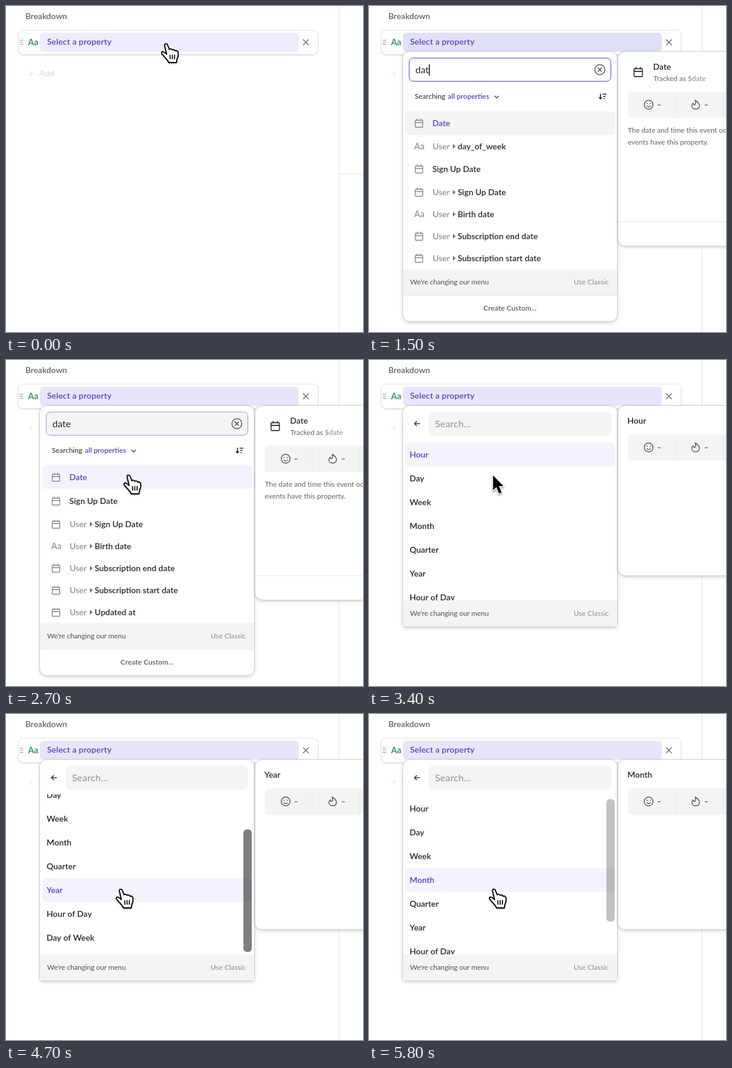
An HTML page with a canvas that plays this animation: 600 by 548 pixels, repeating every 5900 ms.

```html
<!DOCTYPE html>
<html lang="en">
<head>
<meta charset="utf-8">
<title>Property picker</title>
<style>
html, body { margin: 0; width: 100%; height: 100%; overflow: hidden; background: #fff; }
canvas { display: block; width: 600px; height: 548px; }
</style>
</head>
<body>
<canvas id="stage"></canvas>
<script>
const W = 600, H = 548, LOOP = 5900, STEP = 100;
const canvas = document.getElementById('stage');
const ctx = canvas.getContext('2d');
const ratio = window.devicePixelRatio || 1;
canvas.width = W * ratio;
canvas.height = H * ratio;

const INK = '#262626', SOFT = '#626266', GRAY = '#88888c', PURPLE = '#5243c6';
const LAVENDER = '#f4f2fd', PANEL = '#f4f4f4', LINE = '#e4e4e4';

// Rows: icon, label, optional parent flag
const START_ROWS = [
  ['aa', 'Login Method'], ['aa', 'Country'], ['aa', 'Campaign Source'],
  ['list', 'Account Type'], ['aa', 'Event Name'], ['aa', 'Platform'], ['aa', 'Distinct ID']
];
const SHARED_ROWS = [
  ['cal', 'Sign Up Date', true], ['aa', 'Birth date', true],
  ['cal', 'Subscription end date', true], ['cal', 'Subscription start date', true]
];
const DAT_ROWS = [['cal', 'Date'], ['aa', 'day_of_week', true], ['cal', 'Sign Up Date'], ...SHARED_ROWS];
const DATE_ROWS = [['cal', 'Date'], ['cal', 'Sign Up Date'], ...SHARED_ROWS, ['cal', 'Updated at', true]];
const DAT_Y = [197, 236, 274, 313, 350, 387, 424];
const DATE_Y = [197, 237, 276, 313, 350, 387, 424];
const UNITS = ['Hour', 'Day', 'Week', 'Month', 'Quarter', 'Year', 'Hour of Day', 'Day of Week'];

const clamp = v => Math.max(0, Math.min(1, v));
const mix = (a, b, p) => a + (b - a) * p;
const span = (t, a, b) => clamp((t - a) / (b - a));
const ease = p => p * p * (3 - 2 * p);

// y is the middle of the capitals
function text(str, x, y, size, color, weight = 400, align = 'left', spacing = 0) {
  ctx.font = `${weight} ${size}px Lato, "Open Sans", sans-serif`;
  ctx.textAlign = align;
  ctx.letterSpacing = spacing + 'px';
  ctx.fillStyle = color;
  ctx.fillText(str, x, Math.round(y + size * 0.355));
  return ctx.measureText(str).width;
}

function box(x, y, w, h, r, fill, stroke) {
  ctx.beginPath();
  ctx.roundRect(x, y, w, h, r);
  if (fill) { ctx.fillStyle = fill; ctx.fill(); }
  if (stroke) { ctx.strokeStyle = stroke; ctx.lineWidth = 1; ctx.stroke(); }
}

function stroke(d, color, width = 1.4) {
  ctx.strokeStyle = color;
  ctx.lineWidth = width;
  ctx.stroke(new Path2D(d));
}

function at(x, y, draw) {
  ctx.save();
  ctx.translate(x, y);
  draw();
  ctx.restore();
}

function shadow(alpha, blur, dy) {
  ctx.shadowColor = `rgba(0,0,0,${alpha})`;
  ctx.shadowBlur = blur * ratio;
  ctx.shadowOffsetY = dy * ratio;
}

// The border lies just outside the given rectangle
function card(x, y, w, h, r) {
  ctx.save();
  shadow(0.22, 6, 2);
  box(x, y, w, h, r, '#fff');
  ctx.restore();
  box(x - 0.5, y - 0.5, w + 1, h + 1, r, '#fff', '#cdcdcf');
}

function calendar(x, y, color, s = 1) {
  at(x, y, () => {
    ctx.scale(s, s);
    stroke('M-5 -5H5Q6.3 -5 6.3 -3.7V5.5Q6.3 6.8 5 6.8H-5Q-6.3 6.8 -6.3 5.5V-3.7Q-6.3 -5 -5 -5ZM-6.3 -1H6.3M-3.3 -7.5V-4M3.3 -7.5V-4', color);
  });
}

function icon(kind, y) {
  if (kind === 'aa') text('Aa', 76, y - 0.5, 14.5, GRAY, 500);
  else if (kind === 'cal') calendar(84, y, GRAY);
  else at(84, y, () => stroke('M-7 -5H-5M-7 0H-5M-7 5H-5M-2.5 -5H8M-2.5 0H8M-2.5 5H8', GRAY, 1.6));
}

function row(kind, label, child, y, active) {
  icon(kind, y);
  if (child) {
    text('User', 107, y, 14, GRAY, 500);
    at(141, y, () => { ctx.fillStyle = '#707074'; ctx.fill(new Path2D('M0 -4L4.5 0L0 4Z')); });
  }
  text(label, child ? 149 : 106.5, y, 14, active ? PURPLE : INK, 600);
}

function page(t) {
  ctx.fillStyle = '#fff';
  ctx.fillRect(0, 0, W, H);
  stroke('M559.5 0V548M560 282.5H600', LINE, 1);
  text('Breakdown', 32.5, 17, 14, '#626262', 600);
  ctx.save();
  shadow(0.12, 2, 1);
  box(20.5, 40.5, 504, 41, 8, '#fff', '#e3e3e3');
  ctx.restore();
  box(20.5, 40.5, 504, 41, 8, '#fff', '#e3e3e3');
  stroke('M23 57.5H29M23 61H29M23 64.5H29', '#8c8c8c', 1);
  text('Aa', 37, 60.5, 14.5, '#36946b', 700);
  box(57, 45, 435, 32, 6, t < 100 ? '#eeebfc' : t < 2600 ? '#e0dff8' : '#e8e5fb');
  text('Select a property', 69, 60.5, 14, PURPLE, 600, 'left', 0.18);
  at(504, 61, () => stroke('M-4.7 -4.7L4.7 4.7M4.7 -4.7L-4.7 4.7', '#666'));
  at(42, 114, () => stroke('M-5 0H5M0 -5V5', t < 200 ? '#dcdcdc' : '#ebebeb', 1.1));
  text('Add', 55.5, 113, 14, '#d9d9d9', 400, 'left', 0.2);
}

function footer(y) {
  ctx.fillStyle = PANEL;
  ctx.fillRect(57, y, 360, 44);
  text("We're changing our menu", 69, y + 22, 12, '#505054', 400, 'left', -0.1);
  text('Use Classic', 403, y + 22, 12, '#8c8c90', 400, 'right');
}

function clipped(top, bottom, draw) {
  ctx.save();
  ctx.beginPath();
  ctx.rect(57, top, 360, bottom - top);
  ctx.clip();
  draw();
  ctx.restore();
}

function searchField(t, query) {
  const focusRing = t >= 1500, blurred = t >= 2700;
  if (focusRing) box(67.5, 87.5, 339, 39, 7, blurred ? PANEL : '#fff', blurred ? '#9c92dc' : PURPLE);
  const w = query ? text(query, 78, 107.5, 16, INK) : 0;
  if (!query) text('Search...', 78, 107.5, 16, '#929296', 400, 'left', 0.2);
  if (!blurred) {
    ctx.fillStyle = '#111';
    ctx.fillRect(78 + w, 98, 1.6, 19);
  }
  if (query) {
    at(388, 107, () => {
      ctx.beginPath();
      ctx.arc(0, 0, 8.4, 0, Math.PI * 2);
      ctx.strokeStyle = '#58585c';
      ctx.lineWidth = 1.5;
      ctx.stroke();
      stroke('M-3.4 -3.4L3.4 3.4M3.4 -3.4L-3.4 3.4', '#58585c', 1.5);
    });
  }
}

function mainMenu(t) {
  const searching = t >= 1500;
  const query = 'date'.slice(0, t < 900 ? 0 : t < 1100 ? 1 : t < 1200 ? 2 : t < 1800 ? 3 : 4);
  const rows = !searching ? START_ROWS : t < 1900 ? DAT_ROWS : DATE_ROWS;
  card(57, 77, 360, 453, 12);
  searchField(t, query);

  const x = searching ? 132.5 : 109.5;
  text(searching ? 'Searching' : 'Show', 77, 152, 12, INK);
  text('all properties', x, 152, 12, PURPLE, 600);
  at(x + 82, 153, () => stroke('M-3.5 -2L0 1.7L3.5 -2', PURPLE, 1.6));
  at(392.5, 152, () => stroke('M-3.5 -4.5V4M-6 1.5L-3.5 4.2L-1 1.5M0 -3.8H6.5M1 0H5M1.5 3.8H3.5', '#262626', 1.6));

  box(61, 177, 352, 40, 6, searching && t < 2600 ? PANEL : LAVENDER);
  clipped(170, 442, () => rows.forEach(([kind, label, child], i) => {
    const y = !searching ? 197 + 40 * i : (t < 1900 ? DAT_Y : DATE_Y)[i];
    row(kind, label, child, y, i === 0);
  }));
  footer(442);
  stroke('M57 486.5H417', '#e6e6e6', 1);
  text('Create Custom...', 237, 508, 12, '#58585c', 600, 'center', 0.1);
}

function stats(y) {
  box(435, y - 22, 180, 44, 6, PANEL);
  stroke(`M514.5 ${y - 22}V${y + 22}M594.5 ${y - 22}V${y + 22}`, '#e8e8ea', 1);
  const c = '#5c5c60';
  at(470, y, () => {
    ctx.beginPath();
    ctx.arc(0, 0, 7.4, 0, Math.PI * 2);
    ctx.strokeStyle = c;
    ctx.lineWidth = 1.5;
    ctx.stroke();
    stroke('M-3.4 1.6Q0 6 3.4 1.6M-2.7 -3V-1.3M2.7 -3V-1.3', c, 1.5);
  });
  at(549, y, () => stroke('M-1 -7.5C4 -5 6.5 -1 6.3 2C6 5.5 3.5 7.3 0 7.3C-3.5 7.3 -6.3 5.2 -6.3 2C-6.3 0 -5.3 -1.8 -4.2 -2.8C-3.8 -1 -3 0 -1.8 .2C.3 -1.5 .6 -4.5 -1 -7.5Z', c, 1.5));
  for (const x of [485, 564.5]) stroke(`M${x} ${y + 0.5}H${x + 5}`, c, 1.3);
}

function datePanel() {
  card(419, 77, 200, 326, 12);
  calendar(452.5, 111, INK, 1.12);
  text('Date', 477.5, 102, 14, INK, 600);
  const w = text('Tracked as ', 478, 122, 12, SOFT);
  text('$date', 478 + w, 122, 12, GRAY);
  stats(166);
  text('The date and time this event occurred. Most', 435, 209, 12, SOFT);
  text('events have this property.', 435, 229, 12, SOFT);
  stroke('M419 362.5H600', '#e6e6e6', 1);
}

function unitPanel(name) {
  card(419, 77, 200, 285, 12);
  text(name, 434.3, 102, 14, INK, 600);
  stats(147);
}

function unitMenu(t) {
  const hover = t < 3500 ? 0 : t < 3600 ? 1 : t < 3700 ? 2 : t < 4700 ? 3 : t < 5700 ? 5 : 3;
  const scroll = 63 * (ease(span(t, 3800, 4200)) - ease(span(t, 4700, 5200)));
  card(57, 77, 360, 371, [12, 12, 4, 4]);
  at(81, 107, () => stroke('M4.5 0H-4.3M-0.6 -4L-4.5 0L-0.6 4', '#333', 1.5));
  box(100, 87, 307, 40, 8, PANEL);
  text('Search...', 111, 107.5, 16, '#929296', 400, 'left', 0.2);
  clipped(135, 404, () => UNITS.forEach((name, i) => {
    const y = 159 + 40 * i - scroll;
    if (i === hover) box(61, y - 20, 352, 40, 6, LAVENDER);
    text(name, 68.3, y, 14, i === hover ? PURPLE : INK, 600);
  }));
  if (t >= 3900) {
    const alpha = 0.5 - 0.26 * span(t, 5500, 5800);
    box(399, 143 + scroll * 51 / 63, 14, 206, 6, `rgba(0,0,0,${alpha})`);
  }
  footer(404);
  unitPanel(UNITS[hover]);
}

const HAND = new Path2D('M6 3.2C5.4 0 10 -.6 11 2.5L14 10C15 8.5 18 8.8 18.8 10.8C20.5 9.6 23 10.2 23.8 12.4C26 11.3 29 12.8 29 16C29.5 20 28.5 23 27 26L26 32L13 32C12 29 8 25 5 21.5C3 18.5 0 17 1 14.8C2.2 12.8 5.5 14 9.5 18Z');
const ARROW = new Path2D('M0 0V25L5.5 19.7L10.2 30.5L14.4 28.7L9.9 18.1H17.5Z');

function hand(x, y) {
  at(x + 0.5, y + 1, () => {
    ctx.save();
    shadow(0.4, 3, 2);
    ctx.fillStyle = '#fff';
    ctx.fill(HAND);
    ctx.restore();
    ctx.strokeStyle = '#000';
    ctx.lineWidth = 1.9;
    ctx.stroke(HAND);
    stroke('M15 19L15.4 26.5M19 18.7V26.5M23 18.7L22.7 26.5', '#000', 1.7);
  });
}

function arrow(x, y) {
  at(x, y, () => {
    ctx.save();
    shadow(0.4, 3, 2);
    ctx.strokeStyle = '#fff';
    ctx.lineWidth = 3;
    ctx.stroke(ARROW);
    ctx.restore();
    ctx.fillStyle = '#000';
    ctx.fill(ARROW);
  });
}

function pointer(t) {
  if (t < 900) {
    const p = span(t, 0, 400);
    hand(mix(260, 254, p), mix(62, 59, p));
  } else if (t < 2000) {
    return;
  } else if (t < 2400) {
    const p = ease(span(t, 1900, 2300));
    const x = mix(254, 197, p), y = mix(59, 193, p);
    if (t < 2100) hand(x, y + 1);
    else arrow(x + 6, y);
  } else if (t < 2800) {
    hand(197, 192);
  } else if (t < 3400) {
    arrow(205, 193);
  } else if (t < 3500) {
    arrow(208.5, 194);
  } else {
    const p = span(t, 3400, 3700);
    hand(mix(200, 184, p) + 17 * ease(span(t, 5500, 5800)), mix(180, 293, p));
  }
}

function frame(now) {
  const t = Math.floor((now % LOOP) / STEP) * STEP;
  ctx.setTransform(ratio, 0, 0, ratio, 0, 0);
  ctx.lineJoin = 'round';
  page(t);
  if (t >= 2800) {
    unitMenu(t);
  } else if (t >= 200) {
    mainMenu(t);
    if (t >= 1500) datePanel();
  }
  pointer(t);
}

let origin = null;
function tick(now) {
  if (origin === null) origin = now;
  frame(now - origin);
  requestAnimationFrame(tick);
}
frame(0);
requestAnimationFrame(tick);
</script>
</body>
</html>
```
